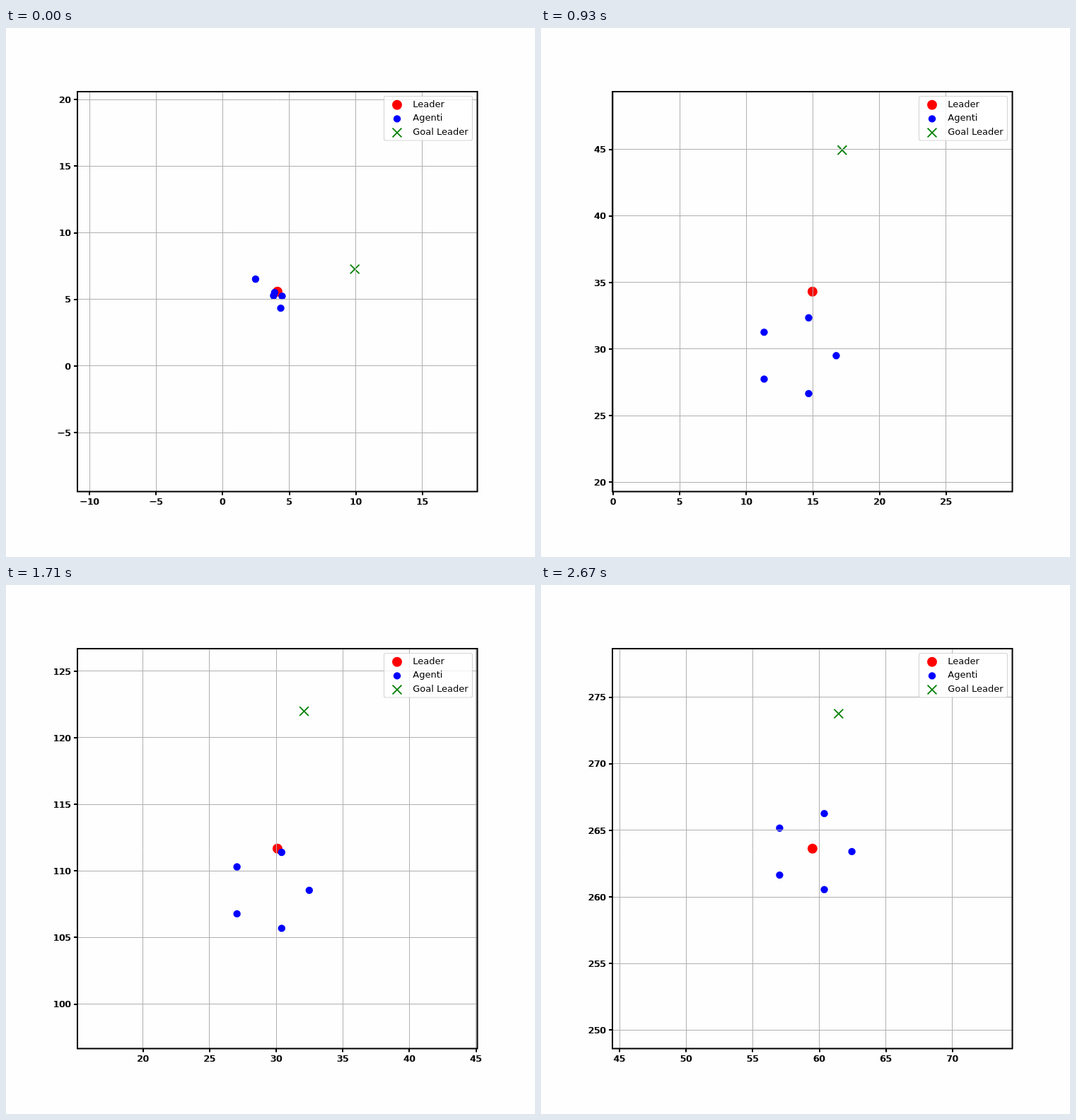
Write an HTML page with a canvas that moves like this. It is 748 px wide and 748 px high and loops after 2700 ms.

```html
<!DOCTYPE html>
<html lang="it">
<head>
<meta charset="utf-8">
<title>Leader e agenti</title>
<style>
html, body { margin: 0; width: 100%; height: 100%; overflow: hidden; background: #fefefe; }
canvas { display: block; }
</style>
</head>
<body>
<canvas id="c" width="748" height="748"></canvas>
<script>
const ctx = document.getElementById('c').getContext('2d');
const STEP = 30, COUNT = 90;
const L = 101, R = 666.5, T = 90, B = 655.5;
const CX = 383.9, CY = 372.8, UNIT = 18.83, HALF = 15;
const FONT = '13px "DejaVu Sans", sans-serif';
const DIR = [0.19005, 0.98177];

// Start of each agent relative to their centre, in pixels, ordered by slot
const START = [[12.4, 2.6], [1.9, -2.6], [-25.1, -21.6], [0.4, 1.9], [10.5, 19.6]];

// How far the agents' centre trails the leader: step, x, y
const LAG = [
  [0, .313, .2], [5, .88, .45], [10, 1.58, 1.1], [15, 1.93, 2.25],
  [22, 1.625, 3.877], [31, 1.211, 4.806], [36, 1.01, 4.86], [42, .875, 4.43],
  [51, .717, 3.648], [64, .494, 2.512], [76, .271, 1.413], [89, .042, .217]
];

function slope(i, k) {
  const a = LAG[Math.max(i - 1, 0)], b = LAG[Math.min(i + 1, LAG.length - 1)];
  return (b[k] - a[k]) / (b[0] - a[0]);
}

function lagAt(n, k) {
  let i = 0;
  while (i < LAG.length - 2 && n >= LAG[i + 1][0]) i++;
  const a = LAG[i], b = LAG[i + 1], h = b[0] - a[0], s = (n - a[0]) / h;
  const s2 = s * s, s3 = s2 * s;
  return a[k] * (2 * s3 - 3 * s2 + 1) + b[k] * (3 * s2 - 2 * s3) +
    h * (slope(i, k) * (s3 - 2 * s2 + s) + slope(i + 1, k) * (s3 - s2));
}

// The leader chases the goal with a gain that grows at every step
function simulate() {
  const states = [];
  let gap = [5.804, 1.69], spread = 1;
  for (let n = 0; n < COUNT; n++) {
    const goal = [9.92 + .0505 * n + .005938 * n * n, 7.27 + .2642 * n + .030675 * n * n];
    const leader = goal.map((g, k) => g - gap[k]);
    const centre = leader.map((p, k) => p - lagAt(n, k + 1));
    const keep = spread;
    const agents = START.map(([sx, sy], i) => {
      const a = i * 2 * Math.PI / 5, tx = 3 * Math.cos(a), ty = 3 * Math.sin(a);
      return [
        centre[0] + tx + (sx / UNIT - tx) * keep,
        centre[1] + ty + (-sy / UNIT - ty) * keep
      ];
    });
    states.push({ goal, leader, agents });
    const gain = .00625 * (n + 1.7);
    gap = gap.map((e, k) => e * (1 - gain) + DIR[k] * (.0625 * n + .285));
    spread *= 1 - 1.6 * gain;
  }
  return states;
}

const states = simulate();

function dot(x, y, r, color) {
  ctx.fillStyle = color;
  ctx.beginPath();
  ctx.arc(x, y, r, 0, 2 * Math.PI);
  ctx.fill();
}

function line(x1, y1, x2, y2, width, color) {
  ctx.strokeStyle = color;
  ctx.lineWidth = width;
  ctx.beginPath();
  ctx.moveTo(x1, y1);
  ctx.lineTo(x2, y2);
  ctx.stroke();
}

function cross(x, y) {
  const r = 6.4;
  line(x - r, y - r, x + r, y + r, 1.8, '#008000');
  line(x - r, y + r, x + r, y - r, 1.8, '#008000');
}

function label(v, x, y, align) {
  const s = String(v).replace('-', '\u2212');
  ctx.textAlign = align;
  ctx.fillStyle = '#000';
  ctx.fillText(s, x - .5, y);
  ctx.fillText(s, x + .5, y);
}

function ticks(mid) {
  const out = [];
  for (let v = Math.ceil((mid - HALF) / 5) * 5; v <= mid + HALF; v += 5) out.push(v);
  return out;
}

function legend() {
  ctx.beginPath();
  ctx.roundRect(534.5, 96.5, 125, 62.5, 2.6);
  ctx.fillStyle = 'rgba(255,255,255,.8)';
  ctx.fill();
  ctx.strokeStyle = 'rgba(204,204,204,.8)';
  ctx.lineWidth = 1.2;
  ctx.stroke();
  dot(553, 108.7, 7, '#f00');
  dot(553, 128.4, 5.2, '#00f');
  cross(553, 148);
  ctx.fillStyle = '#000';
  ctx.textAlign = 'left';
  ['Leader', 'Agenti', 'Goal Leader'].forEach((s, i) => ctx.fillText(s, 575.3, 112 + 19.4 * i));
}

function draw(n) {
  const { goal, leader, agents } = states[n];
  const px = x => CX + (x - leader[0]) * UNIT;
  const py = y => CY - (y - leader[1]) * UNIT;
  ctx.fillStyle = '#fefefe';
  ctx.fillRect(0, 0, 748, 748);
  ctx.font = FONT;

  dot(CX, CY, 7, '#f00');
  for (const [x, y] of agents) dot(px(x), py(y), 5.2, '#00f');
  cross(px(goal[0]), py(goal[1]));

  const xs = ticks(leader[0]), ys = ticks(leader[1]);
  for (const v of xs) {
    const x = Math.floor(px(v)) + .5;
    line(x, T, x, B, 1, '#b0b0b0');
  }
  for (const v of ys) {
    const y = Math.floor(py(v)) + .5;
    line(L, y, R, y, 1, '#b0b0b0');
  }
  for (const v of xs) {
    const x = Math.round(px(v));
    line(x, B, x, B + 5, 2, '#000');
    label(v, px(v), 674, 'center');
  }
  for (const v of ys) {
    const y = Math.round(py(v));
    line(L - 5, y, L, y, 2, '#000');
    label(v, 91.8, Math.round(py(v) + 4.7), 'right');
  }
  ctx.strokeStyle = '#000';
  ctx.lineWidth = 2;
  ctx.strokeRect(L, T, R - L, B - T);
  legend();
}

function tick() {
  draw(Math.floor(performance.now() / STEP) % COUNT);
  requestAnimationFrame(tick);
}
tick();
</script>
</body>
</html>
```
